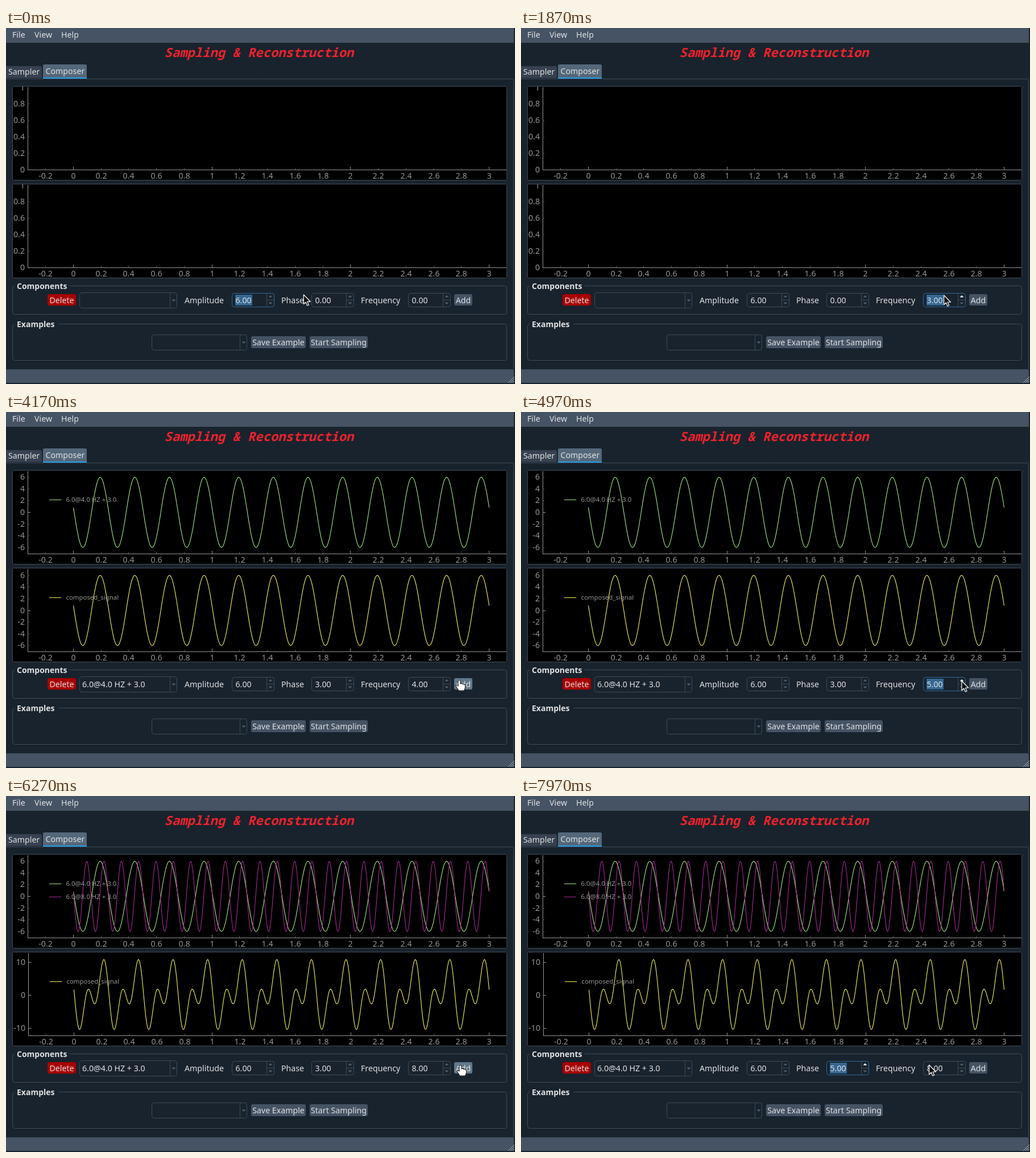
Recreate the animation shown at these times as an HTML page with a canvas. Size 895 by 626 pixels, loop 8 s.

```html
<!DOCTYPE html>
<html lang="en">
<head>
<meta charset="utf-8">
<title>Sampling &amp; Reconstruction</title>
<style>
  html, body { margin: 0; width: 100%; height: 100%; overflow: hidden; background: #19232d; }
  canvas { display: block; }
</style>
</head>
<body>
<canvas id="stage" width="895" height="626"></canvas>
<script>
const ctx = document.getElementById('stage').getContext('2d');
const LOOP = 8000;
const SANS = '"Noto Sans", "Open Sans", sans-serif';
const UI = `14.2px ${SANS}`, BOLD = `bold 14px ${SANS}`, SMALL = `11.4px ${SANS}`;
const TITLE = 'italic 600 22.2px "Noto Sans Mono", "DejaVu Sans Mono", monospace';
const BG = '#19232d', BAR = '#455364', BORDER = '#3d4b5a', BUTTON = '#455364', HOVER = '#60798b',
      TEXT = '#e0e1e3', AXIS = '#969696', FOCUS = '#2c6aa0';
const GREEN = '#a5e887', PURPLE = '#a62a96', YELLOW = '#f2f25c';

// Pointer path: time, x, y
const pointerPath = [
  [0, 523, 469], [120, 560, 474], [650, 774, 472], [1750, 774, 472], [1870, 744, 470],
  [2250, 604, 472], [2980, 604, 472], [3130, 700, 486], [3450, 797, 472], [4250, 797, 472],
  [4600, 776, 472], [4970, 775, 473], [5600, 775, 473], [5850, 799, 474], [6270, 799, 474],
  [6500, 799, 475], [7050, 604, 472], [7780, 604, 472], [7970, 717, 473], [8000, 735, 473]
];
// Spin box steps: time, field, new value
const steps = [
  [900, 'frequency', 1], [1200, 'frequency', 2], [1520, 'frequency', 3], [1930, 'frequency', 4],
  [2420, 'phase', 1], [2780, 'phase', 2], [3200, 'phase', 3],
  [4750, 'frequency', 5], [5080, 'frequency', 6], [5330, 'frequency', 7], [5580, 'frequency', 8],
  [7250, 'phase', 4], [7600, 'phase', 5]
];
const addTimes = [3750, 6050];
const waves = [{ hz: 4, color: GREEN }, { hz: 8, color: PURPLE }];
const waveName = w => `6.0@${w.hz}.0 HZ + 3.0`;
const waveAt = (w, t) => 6 * Math.sin(2 * Math.PI * w.hz * t + 3);

function stateAt(time) {
  const state = { amplitude: 6, phase: 0, frequency: 0, focus: 'amplitude', stepped: false };
  for (const [t, field, value] of steps) {
    if (time < t) break;
    state[field] = value;
    state.focus = field;
    state.stepped = true;
  }
  state.count = addTimes.filter(t => time >= t).length;
  const lastStep = steps.filter(s => s[0] <= time).pop();
  if (state.count && lastStep[0] < addTimes[state.count - 1]) state.focus = 'add';
  return state;
}

function pointerAt(time) {
  const i = pointerPath.findIndex(p => p[0] > time);
  const [t0, x0, y0] = pointerPath[i - 1], [t1, x1, y1] = pointerPath[i];
  const k = (time - t0) / (t1 - t0);
  return [x0 + (x1 - x0) * k, y0 + (y1 - y0) * k];
}

function fill(x, y, w, h, color, radius = 0) {
  ctx.fillStyle = color;
  ctx.beginPath();
  ctx.roundRect(x, y, w, h, radius);
  ctx.fill();
}

function frame(x, y, w, h, color = BORDER, radius = 4) {
  ctx.strokeStyle = color;
  ctx.lineWidth = 1;
  ctx.beginPath();
  ctx.roundRect(x + .5, y + .5, w - 1, h - 1, radius);
  ctx.stroke();
}

function text(str, x, y, { font = UI, color = TEXT, align = 'left' } = {}) {
  ctx.font = font;
  ctx.fillStyle = color;
  ctx.textAlign = align;
  ctx.fillText(str, x, y);
}

function line(x0, y0, x1, y1, color) {
  ctx.strokeStyle = color;
  ctx.lineWidth = 1;
  ctx.beginPath();
  ctx.moveTo(x0, y0);
  ctx.lineTo(x1, y1);
  ctx.stroke();
}

function arrow(x, y, dir, color) {
  ctx.fillStyle = color;
  ctx.beginPath();
  ctx.moveTo(x - 3.5, y - 1.5 * dir);
  ctx.lineTo(x + 3.5, y - 1.5 * dir);
  ctx.lineTo(x, y + 2 * dir);
  ctx.fill();
}

function button(label, x, y, w, h, color = BUTTON) {
  fill(x, y, w, h, color, 3);
  text(label, x + w / 2, y + 15.5, { align: 'center' });
}

function combo(x, y, w, label) {
  frame(x, y, w, 28);
  line(x + w - 12.5, y + 1, x + w - 12.5, y + 27, BORDER);
  arrow(x + w - 6, y + 14, 1, '#53616c');
  text(label, x + 5, y + 19);
}

function spinBox(x, value, focused, hot) {
  const color = focused ? FOCUS : BORDER;
  frame(x, 466, 75, 25, color);
  line(x + 61.5, 467, x + 61.5, 490, BORDER);
  line(x + 62, 478.5, x + 74, 478.5, BORDER);
  arrow(x + 68, 472, -1, hot ? '#fff' : '#53616c');
  arrow(x + 68, 484, 1, '#53616c');
  if (focused) fill(x + 6, 469, 30, 19, '#346792');
  text(value.toFixed(2), x + 6.5, 483.5);
}

function groupBox(title, y, h, gap) {
  frame(11, y, 870, h);
  fill(15, y - 2, gap, 5, BG);
  text(title, 19, y + 6, { font: BOLD });
}

function plot(top, axisX, zeroY, unitY, labels, majorY, curves) {
  const left = axisX + 80, unitX = (849 - left) / 3, base = top + 147;
  fill(11, top, 870, 166, '#000');
  ctx.save();
  ctx.beginPath();
  ctx.rect(12, top + 1, 868, 164);
  ctx.clip();

  line(axisX + .5, top + 2, axisX + .5, base, AXIS);
  line(axisX, base + .5, 880, base + .5, AXIS);
  for (let i = -1; i <= 15; i++) {
    const x = Math.round(left + i * .2 * unitX) + .5, major = i % 5 === 0;
    line(x, base, x, base - (major ? 5 : 3), major ? AXIS : '#555');
    text(String(+(i * .2).toFixed(1)), x, top + 163, { color: AXIS, align: 'center' });
  }
  for (const value of labels) {
    const y = zeroY - value * unitY, major = majorY(value);
    line(axisX, Math.round(y) + .5, axisX + (major ? 5 : 3), Math.round(y) + .5, major ? AXIS : '#555');
    text(String(value), axisX - 5, y + 5, { color: AXIS, align: 'right' });
  }

  for (const { fn, color } of curves) {
    ctx.strokeStyle = color;
    ctx.lineWidth = 1.1;
    ctx.beginPath();
    for (let i = 0; i <= 1500; i++) {
      const t = i / 500;
      ctx.lineTo(left + .5 + t * unitX, zeroY + .5 - fn(t) * unitY);
    }
    ctx.stroke();
  }
  curves.forEach(({ name, color }, i) => {
    const y = top + 52.5 + 23 * i;
    line(axisX + 38, y, axisX + 59, y, color);
    text(name, axisX + 67.5, y + 3.5, { font: SMALL, color: AXIS });
  });
  ctx.restore();
  frame(11, top, 870, 166, BORDER, 1);
}

function plots(count) {
  const unitLabels = [0, .2, .4, .6, .8, 1], sixLabels = [-6, -4, -2, 0, 2, 4, 6];
  const atZero = v => v === 0;
  if (!count) {
    for (const top of [102, 274]) plot(top, 38, top + 147, 144.5, unitLabels, atZero, []);
    return;
  }
  const shown = waves.slice(0, count);
  const curves = shown.map(w => ({ name: waveName(w), color: w.color, fn: t => waveAt(w, t) }));
  const sum = [{
    name: 'composed_signal', color: YELLOW,
    fn: t => shown.reduce((total, w) => total + waveAt(w, t), 0)
  }];
  plot(102, 38, 176, 10.27, sixLabels, atZero, curves);
  if (count === 1) plot(274, 38, 348.5, 10.27, sixLabels, atZero, sum);
  else plot(274, 39, 350, 5.82, [-10, 0, 10], () => true, sum);
}

function windowChrome() {
  fill(0, 0, 895, 626, BG);
  fill(0, 0, 893, 26, BAR);
  text('File', 11, 17);
  text('View', 50, 17);
  text('Help', 97, 17);
  text('Sampling & Reconstruction', 445, 51, { font: TITLE, color: '#f0222c', align: 'center' });

  frame(-5, 89, 898, 512, BORDER, 2);
  fill(0, 67, 63, 21, '#37414f', [0, 3, 0, 0]);
  text('Sampler', 4, 82);
  fill(65, 64, 77, 25, '#54687a', [3, 3, 0, 0]);
  fill(65, 87, 77, 2, '#259ae9');
  text('Composer', 69.5, 81);

  fill(0, 601, 893, 23, BAR);
  for (const d of [3, 7, 11]) line(894 - d, 624, 894, 624 - d, '#aeb4bd');
}

function drawPointer(x, y) {
  const path = new Path2D('M0 0V16.5L3.8 13L6.3 19L9 17.8L6.5 12H11.8Z');
  drawShape(path, x, y, '#0c0c0c', '#fff');
}

function drawHand(x, y) {
  const path = new Path2D('M-2 1Q0 -2 2 1V6Q4 4 5.5 6.5Q7.5 5 8.5 7.5Q10.5 6 10.5 9V13L8.5 18H-1L-6 10Q-6.5 7 -2 10Z');
  drawShape(path, x, y, '#fff', '#222');
}

function drawShape(path, x, y, inside, outline) {
  ctx.save();
  ctx.translate(x, y);
  ctx.fillStyle = inside;
  ctx.fill(path);
  ctx.strokeStyle = outline;
  ctx.lineWidth = 1.2;
  ctx.lineJoin = 'round';
  ctx.stroke(path);
  ctx.restore();
}

function render(time) {
  const state = stateAt(time);
  const [px, py] = pointerAt(time);
  const overAdd = px >= 788 && px <= 820 && py >= 468 && py <= 488;

  windowChrome();
  plots(state.count);

  groupBox('Components', 453, 51, 97);
  button('Delete', 73, 468, 50, 20, '#a80000');
  combo(129, 465, 172, state.count ? waveName(waves[0]) : '');
  [['Amplitude', 314, 397], ['Phase', 484, 537], ['Frequency', 624, 707]].forEach(([label, labelX, boxX]) => {
    const field = label.toLowerCase(), focused = state.focus === field;
    text(label, labelX, 484);
    spinBox(boxX, state[field], focused, focused && state.stepped);
  });
  button('Add', 788, 468, 32, 20, overAdd ? HOVER : BUTTON);

  groupBox('Examples', 520, 65, 77);
  combo(256, 539, 168, '');
  button('Save Example', 431, 542, 96, 21);
  button('Start Sampling', 534, 542, 102, 21);

  (overAdd ? drawHand : drawPointer)(px, py);
}

const start = performance.now();
function tick() {
  render((performance.now() - start) % LOOP);
  requestAnimationFrame(tick);
}
tick();
</script>
</body>
</html>
```
